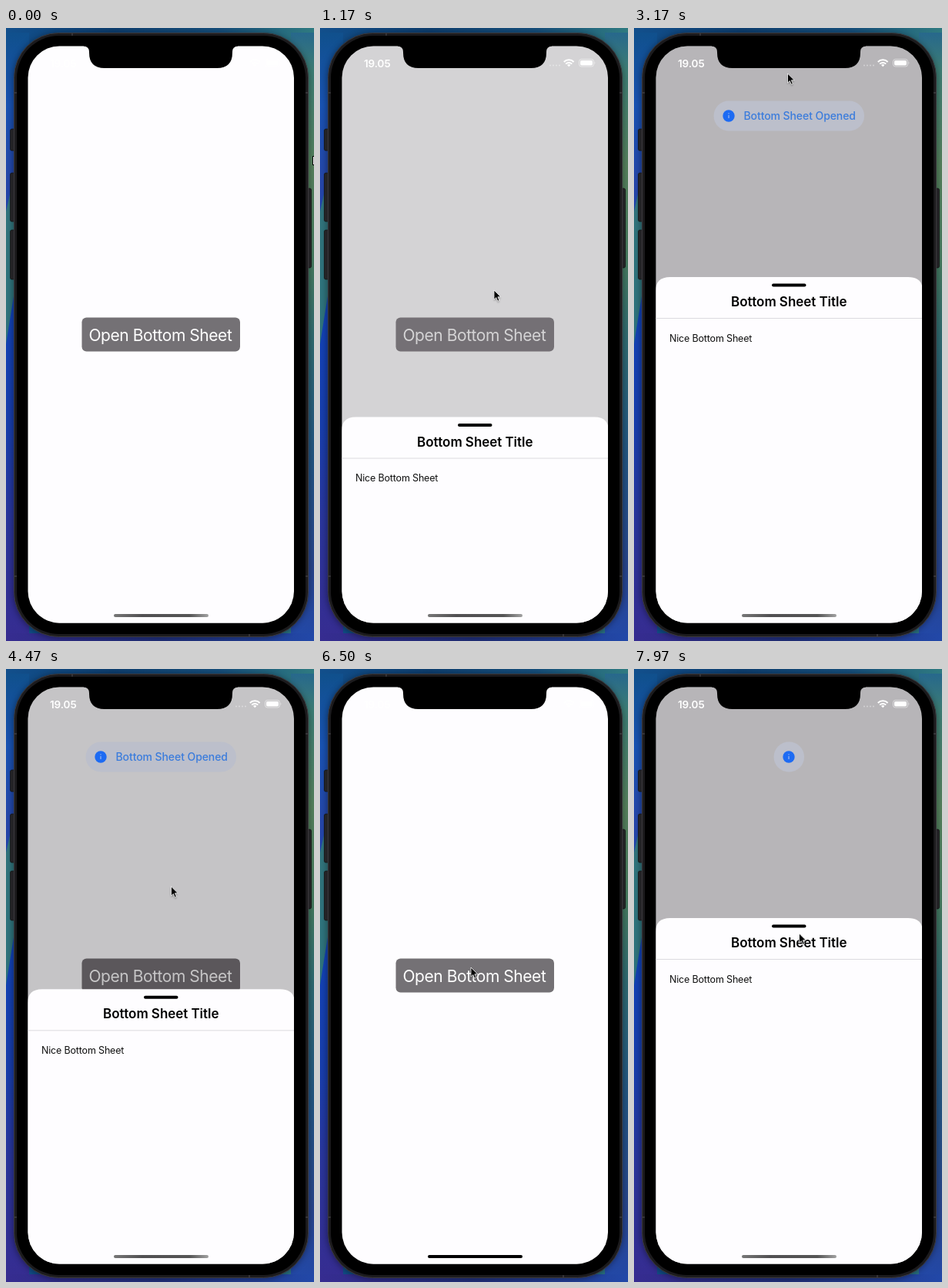
Animation, 400 px wide and 795 px high, one loop 8 s. Source, as an HTML page:

```html
<!DOCTYPE html>
<html lang="en">
<head>
<meta charset="utf-8">
<title>Bottom sheet</title>
<style>
  html, body { margin: 0; width: 100%; height: 100%; overflow: hidden; background: #123f78; }
  svg { display: block; width: 400px; height: 795px; }
  text { font-family: Inter, "Open Sans", sans-serif; white-space: pre; }
</style>
</head>
<body>
<svg viewBox="0 0 400 795">
  <defs>
    <linearGradient id="top">
      <stop offset="0" stop-color="#124f8c"/><stop offset=".35" stop-color="#0e3f70"/>
      <stop offset=".7" stop-color="#164f7c"/><stop offset="1" stop-color="#2f7a80"/>
    </linearGradient>
    <linearGradient id="left" x2="0" y2="1">
      <stop offset="0" stop-color="#10508c"/><stop offset=".12" stop-color="#1953b4"/>
      <stop offset=".25" stop-color="#2646aa"/><stop offset=".45" stop-color="#1243b8"/>
      <stop offset=".65" stop-color="#183eac"/><stop offset=".8" stop-color="#2a369c"/>
      <stop offset="1" stop-color="#362c90"/>
    </linearGradient>
    <linearGradient id="right" x2="0" y2="1">
      <stop offset="0" stop-color="#27688c"/><stop offset=".06" stop-color="#3c7c74"/>
      <stop offset=".22" stop-color="#55805c"/><stop offset=".38" stop-color="#44795f"/>
      <stop offset=".5" stop-color="#2f6a70"/><stop offset=".7" stop-color="#225482"/>
      <stop offset=".88" stop-color="#28448c"/><stop offset="1" stop-color="#2248a8"/>
    </linearGradient>
    <linearGradient id="bottom">
      <stop offset="0" stop-color="#362c90"/><stop offset=".5" stop-color="#20307c"/>
      <stop offset="1" stop-color="#2248a8"/>
    </linearGradient>
    <linearGradient id="homeFade">
      <stop offset="0" stop-color="#777"/><stop offset=".3" stop-color="#515052"/>
      <stop offset=".8" stop-color="#555"/><stop offset="1" stop-color="#a2a2a2"/>
    </linearGradient>
    <filter id="blur" x="-10%" y="-10%" width="120%" height="120%"><feGaussianBlur stdDeviation="4"/></filter>
    <filter id="soft" x="-50%" y="-50%" width="200%" height="200%"><feGaussianBlur stdDeviation="1"/></filter>
    <clipPath id="screen"><rect x="28.500" y="23.500" width="345.500" height="748" rx="41"/></clipPath>
  </defs>

  <!-- desktop -->
  <rect width="400" height="795" fill="url(#top)"/>
  <rect y="6" width="30" height="789" fill="url(#left)"/>
  <rect x="370" y="6" width="30" height="789" fill="url(#right)"/>
  <rect y="785" width="400" height="10" fill="url(#bottom)"/>
  <path d="M12 185L0 238V410L12 335Z" fill="#347d74" opacity=".85"/>
  <rect x="9" y="7" width="384" height="784" rx="60" fill="#000" opacity=".4" filter="url(#blur)"/>

  <!-- phone -->
  <g fill="#242326" stroke="#111" stroke-width=".7">
    <rect x="5.500" y="131" width="7" height="28" rx="2"/>
    <rect x="5.500" y="188" width="7" height="63" rx="2"/>
    <rect x="5.500" y="262" width="7" height="64" rx="2"/>
    <rect x="390" y="208" width="6.500" height="103" rx="2"/>
  </g>
  <rect x="10.500" y="6.500" width="382" height="783" rx="58" fill="#1c1b1d" stroke="#3b393d"/>
  <rect x="14" y="10" width="375" height="776" rx="55" fill="#000"/>
  <path d="M86 7v3M11 84h3M11 711h3M389 84h3M389 711h3M316 786v3" stroke="#353337" stroke-width="2"/>

  <g clip-path="url(#screen)">
    <rect x="28" y="23" width="347" height="749" fill="#fefdff"/>
    <g id="button">
      <rect x="98.500" y="375.500" width="205.500" height="44" rx="6" fill="#747175"/>
      <text x="107.500" y="405.500" font-size="21" letter-spacing="-.45" fill="#fff">Open Bottom Sheet</text>
    </g>
    <rect id="dim" x="28" y="23" width="347" height="749" fill="#060008"/>

    <g fill="#fff">
      <text x="57" y="50.500" font-size="13.500" font-weight="600" letter-spacing="-.1">19.05</text>
      <g opacity=".4">
        <circle cx="299" cy="48.500" r="1"/><circle cx="303" cy="48.500" r="1"/>
        <circle cx="307" cy="48.500" r="1"/><circle cx="311" cy="48.500" r="1"/>
      </g>
      <g fill="none" stroke="#fff" stroke-width="2">
        <path d="M316.800 44a9 9 0 0 1 12.800 0M319.200 46.600a5.600 5.600 0 0 1 8 0"/>
      </g>
      <path d="M323.200 50.300l-2.200-2.300a3.200 3.200 0 0 1 4.400 0z"/>
      <rect x="336.500" y="40.500" width="19" height="9.500" rx="3" fill="none" stroke="#fff" stroke-opacity=".5"/>
      <rect x="338" y="42" width="16" height="6.500" rx="1.700"/>
      <path d="M356.700 43.500q1.600 1.700 0 3.400z" opacity=".6"/>
    </g>

    <g id="sheet">
      <path d="M28 480V18Q28 0 47 0H356Q375 0 375 18V480Z" fill="#fefdff"/>
      <rect x="179" y="8.500" width="44.500" height="4" rx="2"/>
      <text x="126" y="38" font-size="17" font-weight="600" letter-spacing="-.05">Bottom Sheet Title</text>
      <path d="M28 53.500H375" stroke="#dcdbdf"/>
      <text x="46" y="83.500" font-size="12.500" letter-spacing="-.17" fill="#111">Nice Bottom Sheet</text>
    </g>

    <g id="toast">
      <rect id="pill" y="94.500" height="39" rx="19.500" fill="#bcbfcb"/>
      <g id="info">
        <circle cy="114" r="7.700" fill="#1d6bf3"/>
        <path d="M0 113v4M0 110.300v1.200" stroke="#b9c8ec" stroke-width="1"/>
      </g>
      <text id="message" x="142.500" y="119" font-size="14" font-weight="500" letter-spacing="-.08" fill="#3b7cdc">Bottom Sheet Opened</text>
    </g>
    <rect id="home" x="140" y="760" width="123" height="4" rx="2"/>
  </g>

  <path d="M101 20V23.500Q108 24 108 31V32Q108 52 128 52H274Q294 52 294 32V31Q294 24 301 23.500V20Z"/>

  <rect id="edge" x="398.500" y="166.500" width="6" height="11" fill="#fff" stroke="#000"/>
  <g id="cursor">
    <path d="M0 1.500V14l3-2.700 2 4.700 2-.9-2-4.500h4z" opacity=".35" filter="url(#soft)"/>
    <path d="M0 0V12.200l2.800-2.600 2 4.600 2.100-.9-2-4.500h3.900z" stroke="#fff" stroke-width=".8"/>
  </g>
</svg>

<script>
const LOOP = 8000;
const $ = id => document.getElementById(id);
const set = (id, attrs) => { for (const k in attrs) $(id).setAttribute(k, attrs[k]); };
const mix = (a, b, u) => a + (b - a) * u;
const span = (t, start, length) => Math.min(1, Math.max(0, (t - start) / length));
const easeOut = u => 1 - (1 - u) ** 3;
const easeBoth = u => (1 - Math.cos(Math.PI * u)) / 2;

const OPENINGS = [1041, 7341];
const CLOSING = 4369;
const TOAST_END = 5500;

// time, x, y of the pointer tip
const POINTER = [
  [120, 402, 178], [650, 232, 376], [820, 212, 394], [1010, 212, 392],
  [1170, 226, 340], [1700, 224, 322], [2500, 204, 110], [3170, 199.5, 59],
  [3550, 200, 62], [4250, 214.5, 280], [4470, 214.5, 282], [4750, 214, 290],
  [5200, 212.5, 312], [5900, 200, 372], [6300, 196, 387], [7300, 196, 387],
  [7650, 212, 348], [7970, 214.5, 343], [8000, 214.5, 343]
];

function pointerAt(t) {
  const i = Math.max(1, POINTER.findIndex(p => p[0] > t));
  const [a, b] = [POINTER[i - 1], POINTER[i]];
  const u = easeBoth(span(t, a[0], b[0] - a[0]));
  return [mix(a[1], b[1], u), mix(a[2], b[2], u)];
}

function drawSheet(t, opened) {
  let shown = easeOut(span(t, opened, 500));
  if (opened < CLOSING) shown *= 1 - easeBoth(span(t, CLOSING, 340));
  set('sheet', { transform: `translate(0 ${mix(771, 323, shown)})` });
  set('dim', { opacity: 0.286 * shown });
  const pressed = t > opened - 70 && t < opened + 260;
  set('button', { opacity: pressed ? mix(0.6, 1, span(t, opened, 220)) : 1 });
}

function drawToast(t, opened) {
  const first = opened < TOAST_END;
  const leave = first ? span(t, TOAST_END + 280, 220) : 0;
  const grow = easeOut(span(t, opened + 400, 200)) * (1 - leave);
  const wide = easeBoth(span(t, opened + 680, 320)) * (first ? 1 - easeBoth(span(t, TOAST_END, 280)) : 1);
  const width = mix(39.5, 195.5, wide);
  set('toast', { opacity: grow, transform: `translate(201.3 114) scale(${grow}) translate(-201.3 -114)` });
  set('pill', { x: 201.3 - width / 2, width });
  set('info', { transform: `translate(${mix(201, 123, wide)} 0)` });
  set('message', { opacity: span(wide, 0.6, 0.4) });
}

function draw(t) {
  const opened = t < OPENINGS[1] - 70 ? OPENINGS[0] : OPENINGS[1];
  drawSheet(t, opened);
  drawToast(t, opened);
  const [x, y] = pointerAt(t);
  set('cursor', { transform: `translate(${x} ${y})`, opacity: t < 120 ? 0 : 1 });
  set('edge', { opacity: t < 120 ? 1 : 0 });
  set('home', { fill: t > 6100 && t < 7450 ? '#000' : 'url(#homeFade)' });
}

const begin = performance.now();
function tick() {
  draw((performance.now() - begin) % LOOP);
  requestAnimationFrame(tick);
}
tick();
</script>
</body>
</html>
```
